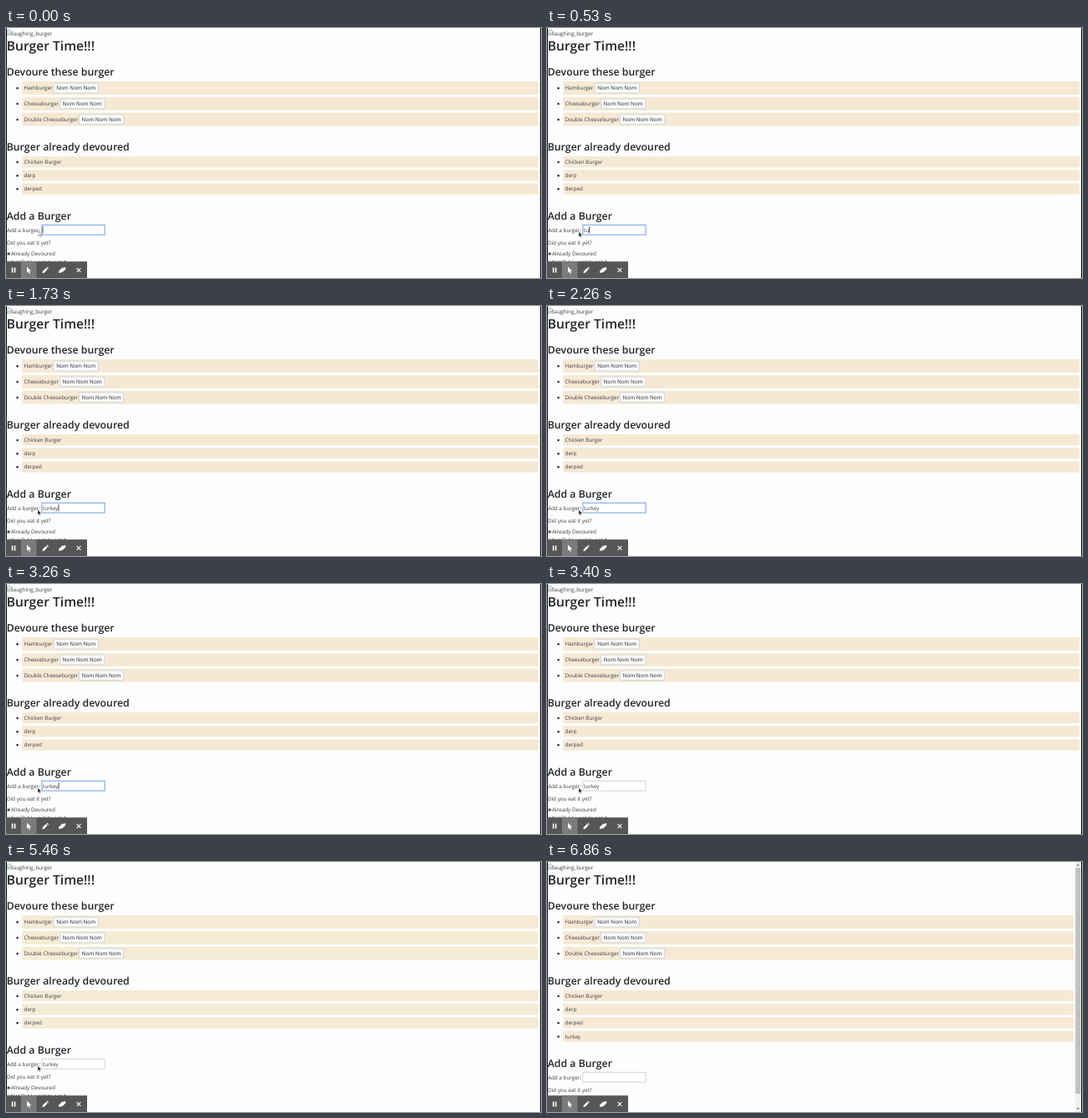
An HTML page for the animation above (8000 ms loop, 640 by 300 pixels).

```html
<!DOCTYPE html>
<html lang="en">
<head>
<meta charset="utf-8">
<title>Burger Time</title>
<style>
html, body { margin: 0; width: 100%; height: 100%; overflow: hidden; background: #fdfdfd; }
svg { display: block; width: 640px; height: 300px; }
text { font: 6.35px "Open Sans", "Noto Sans", sans-serif; fill: #3a3d40; text-rendering: geometricPrecision; white-space: pre; }
.h1, .h2 { font-weight: 600; fill: #212529; }
.h1 { font-size: 15.6px; }
.h2 { font-size: 12.3px; }
.btn { fill: #25282b; }
</style>
</head>
<body>
<svg viewBox="0 0 640 300">
  <rect width="640" height="300" fill="#fdfdfd"/>
  <g fill="none" stroke="#a5a8ab" stroke-width=".7">
    <path d="M1.4 2.4h3.6l1.6 1.6v4.8H1.4z" fill="#dfe8f2"/>
    <path d="M1.6 8.4l2-2.2 1.2 1 1.7-1.6" stroke="#6fa26a"/>
  </g>
  <text x="7" y="8.6">laughing_burger</text>
  <text class="h1" x="0.8" y="27.3">Burger Time!!!</text>
  <text class="h2" x="0.7" y="57.3">Devoure these burger</text>
  <g id="menu"></g>
  <text class="h2" x="0.7" y="147.2">Burger already devoured</text>
  <g id="eaten"></g>
  <g id="form">
    <text class="h2" x="0.7" y="229.7">Add a Burger</text>
    <text x="0.9" y="244.5">Add a burger:</text>
    <rect id="field" x="42.9" y="236.3" width="75.2" height="11.8" fill="#fff"/>
    <text id="typed" x="44" y="244.5"></text>
    <rect id="caret" y="238.2" width=".8" height="8" fill="#222"/>
    <text x="0.9" y="260.2">Did you eat it yet?</text>
    <circle cx="3.2" cy="271" r="1.9" fill="#fff" stroke="#777" stroke-width=".5"/>
    <circle cx="3.2" cy="271" r="1.2" fill="#333"/>
    <text x="6" y="273.3">Already Devoured</text>
    <circle cx="3.2" cy="281" r="1.9" fill="#fff" stroke="#777" stroke-width=".5"/>
    <text x="6" y="283.4">No! But I want to eat it</text>
  </g>
  <path id="pointer" d="M0 0v6l1.4-1.2 1 2 .9-.4-.9-2h1.9z" stroke-width=".5"/>
  <g id="scrollbar">
    <rect x="631.5" width="7.5" height="300" fill="#f1f1f1"/>
    <rect x="632.2" y="7" width="6" height="271" fill="#c1c1c1"/>
    <path d="M633.6 4.6l1.6-2 1.6 2zM633.6 295l1.6 2 1.6-2z" fill="#555"/>
  </g>
  <path d="M0 0h1v300h-1zM639 0h1v300h-1z" fill="#111"/>
  <rect y="280.2" width="97" height="19.8" fill="#565656"/>
  <rect x="18" y="280.2" width="18.5" height="19.8" fill="#7b7b7b"/>
  <g fill="#fff">
    <path d="M6.8 287.6h1.6v6H6.8zM9.8 287.6h1.6v6H9.8z"/>
    <path d="M25 286.6v7.2l1.7-1.5 1.2 2.6 1.2-.5-1.2-2.6h2.3z"/>
    <path d="M43.4 294.2l.5-2.3 3.9-3.9 1.8 1.8-3.9 3.9zM48.4 287.4l.8-.8 1.8 1.8-.8.8z"/>
    <path d="M63.2 291.4l3.6-3.5 4.4-.9v2.4l-3.6 3.6-4.4.9z"/>
    <path d="M84.6 288.1l4.8 4.8M89.4 288.1l-4.8 4.8" stroke="#fff" stroke-width="1.1"/>
  </g>
</svg>
<script>
const LOOP = 8000, BLUR = 3400, FADE = 5460, SUBMIT = 6860, BLINK = 530;
const KEYS = [330, 530, 800, 1400, 1460, 1730];
const WORD = "turkey";
const $ = id => document.getElementById(id);

function add(parent, tag, attrs, text = "") {
  const el = document.createElementNS("http://www.w3.org/2000/svg", tag);
  for (const k in attrs) el.setAttribute(k, attrs[k]);
  el.textContent = text;
  return parent.appendChild(el);
}

function addRow(list, name, y, height) {
  const row = add(list, "g", {}), mid = y + height / 2;
  add(row, "rect", { class: "bar", x: 19.3, y, height });
  add(row, "circle", { cx: 13.6, cy: mid + 0.3, r: 1.25, fill: "#212529" });
  add(row, "text", { x: 21.5, y: mid + 2.4 }, name);
  return row;
}

[["Hamburger", 57], ["Cheeseburger", 64.6], ["Double Cheeseburger", 87.4]].forEach(([name, x], i) => {
  const y = 64 + i * 18.8;
  const row = addRow($("menu"), name, y, 16);
  add(row, "rect", { x, y: y + 2.2, width: 53.4, height: 11.8, rx: 0.6, fill: "#f8f9fa", stroke: "#c9cdd1", "stroke-width": 0.8 });
  add(row, "text", { class: "btn", x: x + 3.2, y: y + 10.4 }, "Nom Nom Nom");
});
const rows = ["Chicken Burger", "derp", "derped", WORD].map((name, i) =>
  addRow($("eaten"), name, 154 + i * 16.2, 13.3));
const bars = [...document.querySelectorAll(".bar")];

const show = (el, on) => el.setAttribute("visibility", on ? "visible" : "hidden");

function draw(t) {
  const sent = t >= SUBMIT, focused = t < BLUR;
  const count = KEYS.filter(k => t >= k).length;
  const lastKey = count ? KEYS[count - 1] : 0;

  const typed = $("typed");
  typed.textContent = sent ? "" : WORD.slice(0, count);
  const end = count && !sent ? typed.getComputedTextLength() : 0;
  $("caret").setAttribute("x", 43.6 + end + (count ? 0.4 : 0));
  show($("caret"), focused && Math.floor((t - lastKey) / BLINK) % 2 === 0);
  $("field").setAttribute("stroke", focused ? "#6c9fe8" : "#c8c8c8");
  $("field").setAttribute("stroke-width", focused ? 1 : 0.8);

  // The pointer settles just after the start.
  const still = t >= 130;
  const p = $("pointer");
  p.setAttribute("transform", still ? "translate(38 244.6)" : "translate(39 243.8)");
  p.setAttribute("fill", still ? "#111" : "#fff");
  p.setAttribute("stroke", still ? "#eee" : "#555");
  show(p, !sent);

  const tinted = t >= FADE && !sent;
  bars.forEach((bar, i) => {
    bar.setAttribute("width", sent ? 610.7 : 617.5);
    bar.setAttribute("fill", !tinted ? "#f6e9d4" : i === 1 || i === 2 ? "#f4ecd3" : "#f5ead6");
  });
  show(rows[3], sent);
  show($("scrollbar"), sent);
  $("form").setAttribute("transform", sent ? "translate(0 16)" : "");
}

function tick(now) {
  draw(now % LOOP);
  requestAnimationFrame(tick);
}
draw(0);
requestAnimationFrame(tick);
</script>
</body>
</html>
```
